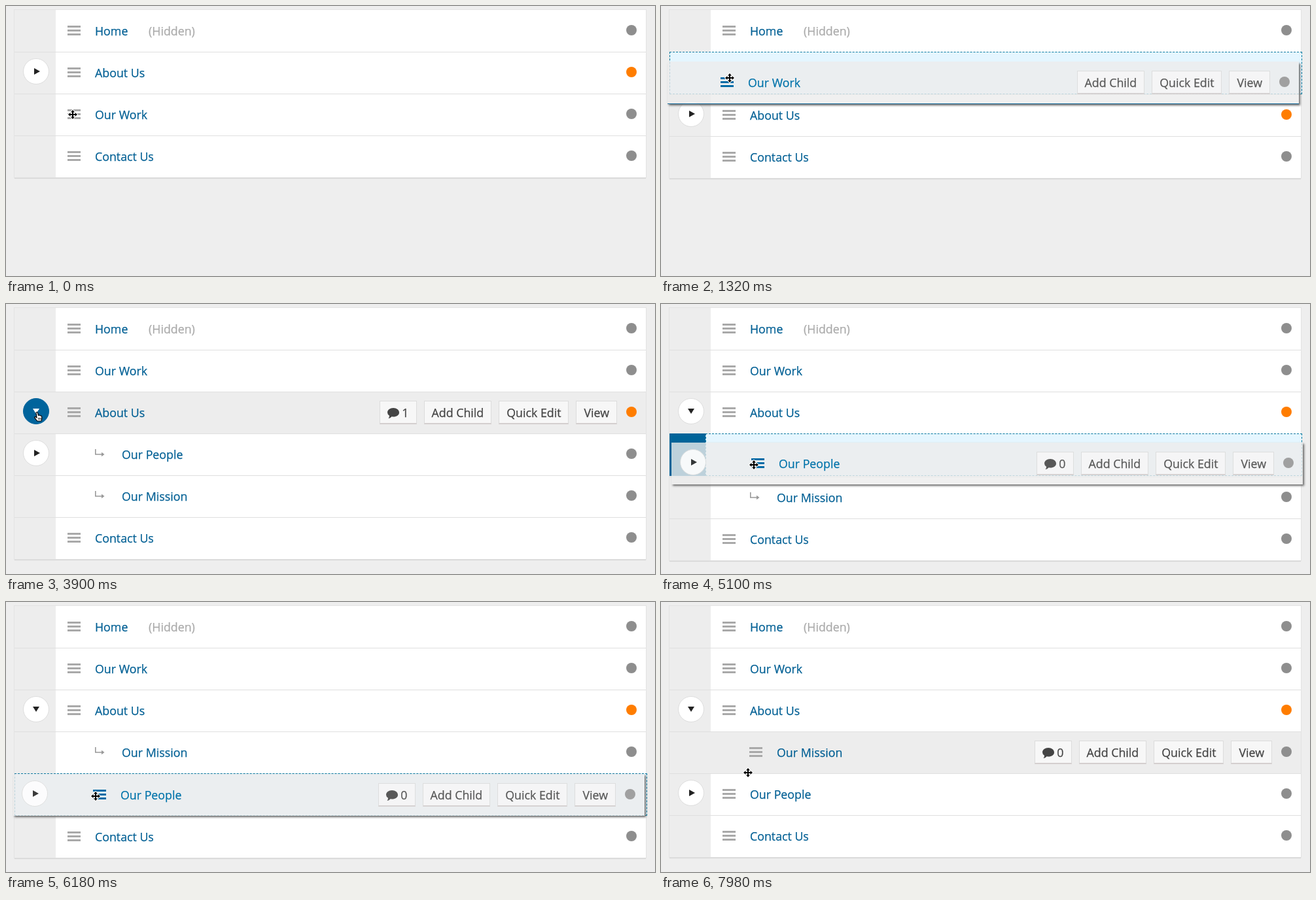
An HTML page for the animation above (8 s loop, 992 px wide and 413 px high).

```html
<!DOCTYPE html>
<html lang="en">
<head>
<meta charset="utf-8">
<title>Sortable page list</title>
<style>
  html, body { margin: 0; width: 100%; height: 100%; overflow: hidden; background: #eee; }
  body { position: relative; font: 17.8px/64px "Open Sans", "Noto Sans", sans-serif; color: #444;
    -webkit-text-stroke: .25px; }
  #list {
    position: absolute; left: 13px; top: 6px; width: 965px;
    background: linear-gradient(90deg, #ededed 63px, #fff 63px);
    box-shadow: 0 0 0 1px #e3e3e3, 0 2px 1px rgba(0, 0, 0, .1);
  }
  .row, .row > *, #slot, #nest, #cursor, #cursor svg { position: absolute; }
  .row { left: 0; top: 0; width: 965px; height: 64px; white-space: nowrap; }
  .row::before { content: ""; position: absolute; left: 0; right: 0; height: 1px; background: #dfdfdf; }
  .row.hover { background: #ededed; }
  .row.tight::before { display: none; }
  .row.drag { background: rgba(237, 237, 237, .8); z-index: 3; box-shadow: 2px 2px 3px #666; }
  .row.drag::before { display: none; }
  #work.drag { box-shadow: 0 1px #1a6f9f, 2px 3px 3px #666; }

  .title { left: 123px; color: #005f94; }
  .drag .title { color: #0073aa; }
  .child .title { left: 164px; }
  .note { left: 205px; color: #aaa; }
  .dot { left: 935px; top: 23px; width: 16px; height: 16px; border-radius: 50%; background: #8e8e8e; }
  .dot.hot { background: #ff7d00; }
  .drag .dot { background: #a0a0a0; }

  .grip { left: 81px; top: 24px; width: 20px; height: 14.6px;
    background: repeating-linear-gradient(#a9a9a9 0 2.6px, transparent 2.6px 6px); }
  .grip.on { background: repeating-linear-gradient(#006ba6 0 2.6px, transparent 2.6px 6px); }
  .child .grip { left: 122px; }
  .child:not(.hover):not(.drag) .grip { display: none; }
  .bend { left: 122px; top: 24px; display: none; }
  .child:not(.hover):not(.drag) .bend { display: block; }

  .toggle { left: 12.5px; top: 10px; width: 38px; height: 38px; border: 1px solid #ddd;
    border-radius: 50%; background: #fff; }
  .toggle::after { content: ""; position: absolute; left: 16px; top: 13.5px;
    border: 5.5px solid transparent; border-left: 9px solid #222; border-right: 0; }
  .toggle.open::after { left: 14.5px; top: 15px; border: 5.5px solid transparent;
    border-top: 8.5px solid #222; border-bottom: 0; }
  .toggle.on { background: #00649c; border-color: #00649c; }
  .toggle.on::after { border-top-color: #fff; }

  .tools { right: 44px; top: 14px; display: none; gap: 11px; line-height: 34px; }
  .hover .tools, .drag .tools { display: flex; }
  .drag .tools, .drag .toggle { opacity: .88; }
  .tools span { height: 33px; padding: 0 11px; border: 1px solid #dcdcdc;
    border-bottom: 2px solid #d4cfcf; background: #f7f7f7; }
  .tools svg { margin-right: 4px; vertical-align: -2px; }
  .edit { left: 262px; color: #0070aa; display: none; }
  .edit.on { display: block; }
  .edit svg { vertical-align: -2px; margin-right: 5px; }

  #slot { box-sizing: border-box; right: -2px; height: 65px; background: #e5f6ff; border: 1px dashed #00789f; }
  #nest { left: 0; width: 55px; height: 65px; background: #006499; }
  #cursor { left: 0; top: 0; z-index: 9; }
  #cursor svg { left: -10px; top: -10px; display: none; }
  #cursor .on { display: block; }
</style>
</head>
<body>
<div id="list"><div id="nest"></div><div id="slot"></div></div>
<div id="cursor">
  <svg class="move" width="20" height="20" viewBox="-10 -10 20 20">
    <path d="M0-7 3-3.6H1V-1H3.6V-3L7 0 3.6 3V1H1V3.6H3L0 7-3 3.6H-1V1H-3.6V3L-7 0-3.6-3V-1H-1V-3.6H-3Z"
      stroke="#fff" stroke-width="2" paint-order="stroke" stroke-linejoin="round"/>
  </svg>
  <svg class="hand" width="20" height="20" viewBox="-10 -10 20 20">
    <path d="M-3-6Q-1.8-7.5-.7-6L.4-1.6 2.2-2 3.6-1.2 5.2-.8Q6 .5 5.8 3L5 7H-1.4L-5.4 1.6Q-5 0-3.4.8L-2 2Z"
      fill="#fff" stroke="#000" stroke-width="1.2" stroke-linejoin="round"/>
    <path d="M.6 2V5M2.4 2V5M4.1 2V5" stroke="#000" stroke-width=".8"/>
  </svg>
  <svg class="arrow" width="20" height="20" viewBox="-10 -10 20 20">
    <path d="M-4-7V6L-1 3.3 1 8 3.2 7 1.2 2.6H5Z" stroke="#fff" stroke-width="1.4"/>
  </svg>
</div>
<script>
const DURATION = 8000;
const $ = id => document.getElementById(id);

const bubble = `<svg width="18" height="16" viewBox="0 0 18 16"><path fill="#444"
  d="M9 0C14 0 18 3 18 7S14 13.5 9 13.5L6.5 13.2Q4.5 15.7 1.5 16 3.2 14 3 11.8 0 10 0 7C0 3 4 0 9 0Z"/></svg>`;
const pencil = `<svg width="16" height="16" viewBox="0 0 16 16"><path fill="#0070aa"
  d="M0 16 1 11 9.5 2.5 13.5 6.5 5 15ZM10.5 1.5 12 0H13L16 3V4L14.5 5.5Z"/><path stroke="#fff" d="M3 12 10 5"/></svg>`;
const bend = `<svg class="bend" width="16" height="14" viewBox="0 0 16 14"><path fill="none" stroke="#999"
  stroke-width="1.6" d="M1.8 0V8H12"/><path fill="#999" d="M11 4.8 15.5 8 11 11.2Z"/></svg>`;

const pages = [
  { id: 'home', title: 'Home', note: '(Hidden)' },
  { id: 'about', title: 'About Us', toggle: true, hot: true, comments: 1 },
  { id: 'work', title: 'Our Work' },
  { id: 'people', title: 'Our People', toggle: true, comments: 0 },
  { id: 'mission', title: 'Our Mission', comments: 0 },
  { id: 'contact', title: 'Contact Us' }
];

for (const p of pages) {
  const row = document.createElement('div');
  row.id = p.id;
  row.className = 'row';
  row.innerHTML =
    (p.toggle ? '<div class="toggle"></div>' : '') +
    `<div class="grip"></div>${bend}<div class="title">${p.title}</div>` +
    (p.note ? `<div class="note">${p.note}</div>` : '') +
    `<div class="edit">${pencil}Edit</div><div class="tools">` +
    (p.comments != null ? `<span>${bubble}${p.comments}</span>` : '') +
    `<span>Add Child</span><span>Quick Edit</span><span>View</span></div>
    <div class="dot${p.hot ? ' hot' : ''}"></div>`;
  $('list').append(row);
}

// "_" is the drop slot; a leading ">" marks a nested entry
const scenes = [
  { at: 0, order: 'home about work contact' },
  { at: 60, order: 'home about work contact', hover: 'work', grip: true },
  { at: 360, order: 'home about _ contact', drag: 'work', grab: [108, 159], from: 134 },
  { at: 1080, order: 'home _ about contact', drag: 'work', grab: [108, 159], from: 134 },
  { at: 1740, order: 'home work about contact', hover: 'work', grip: true },
  { at: 3060, order: 'home work about contact', hover: 'about' },
  { at: 3200, order: 'home work about contact', hover: 'about', toggle: true },
  { at: 3480, order: 'home work about >people >mission contact', hover: 'about', toggle: true },
  { at: 4150, order: 'home work about >people >mission contact', hover: 'about' },
  { at: 4240, order: 'home work about >people >mission contact', hover: 'people' },
  { at: 4400, order: 'home work about >people >mission contact', hover: 'people', grip: true },
  { at: 4680, order: 'home work about >_ >mission contact', drag: 'people', nested: true, grab: [139, 232], from: 198 },
  { at: 5940, order: 'home work about >mission >_ contact', drag: 'people', nested: true, grab: [139, 232], from: 198 },
  { at: 6120, order: 'home work about >mission _ contact', drag: 'people', nested: true, grab: [139, 232], from: 198 },
  { at: 6960, order: 'home work about >mission people contact', hover: 'people', edit: true, tight: 'people' },
  { at: 7830, order: 'home work about >mission people contact', hover: 'mission' }
];

// time, x, y
const path = [
  [0, 102, 166], [180, 104, 164], [360, 108, 159], [900, 105, 121], [1200, 104, 108], [1500, 106, 112],
  [2940, 106, 112], [3300, 47, 166], [3480, 47, 170], [3720, 49, 172], [4020, 49, 172], [4440, 139, 230],
  [4680, 139, 232], [5100, 142, 246], [5400, 144, 264], [5760, 142, 281], [6000, 139, 295], [6240, 137, 298],
  [7740, 137, 298], [7860, 133, 261], [8000, 133, 261]
];

function pointer(t) {
  const i = Math.max(1, path.findIndex(p => p[0] > t));
  const [t0, x0, y0] = path[i - 1], [t1, x1, y1] = path[i];
  const k = (t - t0) / (t1 - t0);
  return [x0 + (x1 - x0) * k, y0 + (y1 - y0) * k];
}

const place = (el, x, y) => { el.style.transform = `translate(${x}px, ${y}px)`; };

function render(t) {
  const s = scenes.filter(c => c.at <= t).pop();
  const [x, y] = pointer(t);
  const shown = new Map();
  let top = 0, slot = null;

  for (const name of s.order.split(' ')) {
    const child = name[0] === '>';
    const id = child ? name.slice(1) : name;
    if (id === '_') {
      slot = { top, child };
      top += child ? 66 : 65;
    } else {
      if (id === s.tight) top -= 1;
      shown.set(id, { x: 0, y: top, child });
      top += 64;
    }
  }
  if (s.drag) {
    shown.set(s.drag, {
      x: Math.round(x - s.grab[0]),
      y: Math.round(s.from - 6 + y - s.grab[1]),
      child: s.nested
    });
  }

  $('list').style.height = top + 'px';
  $('slot').hidden = !slot;
  $('nest').hidden = !(slot && slot.child);
  if (slot) {
    $('slot').style.top = $('nest').style.top = slot.top + 'px';
    $('slot').style.left = (slot.child ? 55 : 0) + 'px';
  }

  for (const { id } of pages) {
    const row = $(id), at = shown.get(id);
    row.hidden = !at;
    if (!at) continue;
    place(row, at.x, at.y);
    const active = s.hover === id, dragged = s.drag === id;
    row.classList.toggle('child', !!at.child);
    row.classList.toggle('hover', active);
    row.classList.toggle('drag', dragged);
    row.classList.toggle('tight', s.tight === id || (!at.y && !dragged));
    row.querySelector('.grip').classList.toggle('on', dragged || (active && !!s.grip));
    row.querySelector('.edit').classList.toggle('on', active && !!s.edit);
    const toggle = row.querySelector('.toggle');
    if (toggle) {
      toggle.classList.toggle('on', active && !!s.toggle);
      toggle.classList.toggle('open', id === 'about' && t >= 3480);
    }
  }

  const kind = x < 68 ? 'hand' : (x > 92 && x < 116) || x > 128 ? 'move' : 'arrow';
  for (const icon of $('cursor').children) icon.classList.toggle('on', icon.classList.contains(kind));
  place($('cursor'), Math.round(x), Math.round(y));
}

const start = performance.now();
function tick() {
  render((performance.now() - start) % DURATION);
  requestAnimationFrame(tick);
}
tick();
</script>
</body>
</html>
```
